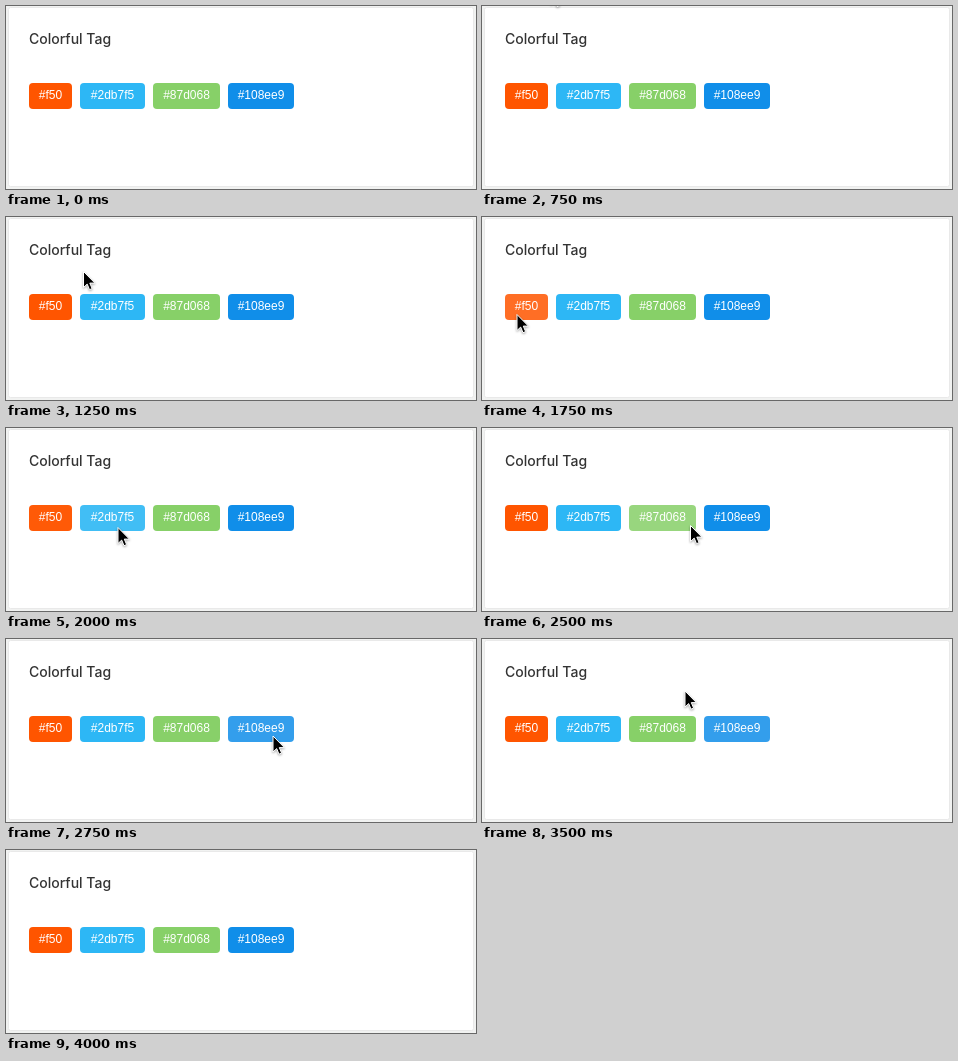
An HTML page that plays this animation: 470 px wide and 183 px high, repeating every 4.5 s.

```html
<!DOCTYPE html>
<html lang="en">
<head>
<meta charset="utf-8">
<title>Colorful Tag</title>
<style>
  html, body { margin: 0; width: 100%; height: 100%; overflow: hidden; background: #f1f2f1; }
  svg { display: block; }
  .title { font: 500 14px Inter, sans-serif; fill: #333; }
  .tag text { font: 12px "Liberation Sans", Arial, sans-serif; fill: #fff; text-anchor: middle; }
  #cursor { filter: drop-shadow(0 1px 1px rgba(0, 0, 0, .35)); }
</style>
</head>
<body>
<svg width="470" height="183" viewBox="0 0 470 183">
  <rect x="2.5" y="1.5" width="465" height="179" rx="2" fill="#fff" stroke="#e9e9e9"/>
  <text class="title" x="23" y="38">Colorful Tag</text>
  <g id="tags"></g>
  <path id="cursor" d="M0 0V16L3.7 12.6L6 18.2L8.6 17.1L6.3 11.6H11.4Z" fill="#000" stroke="#fff" stroke-width="1"/>
</svg>
<script>
const LOOP = 4500, STEP = 250, HOVER = 0.85;

const tags = [
  ['#f50', 23, 43],
  ['#2db7f5', 74, 65],
  ['#87d068', 147, 67],
  ['#108ee9', 222, 66],
].map(([color, x, width]) => {
  const group = add(document.getElementById('tags'), 'g', { class: 'tag' });
  add(group, 'rect', { x, y: 77, width, height: 26, rx: 4, fill: color });
  add(group, 'text', { x: x + width / 2, y: 93 }).textContent = color;
  return group;
});
const cursor = document.getElementById('cursor');

// Pointer position and tag opacities, held from each step until the next one
const rest = { at: null, fade: [1, 1, 1, 1] };
const poses = {
  3: { at: [69, -17.5] },
  4: { at: [80, 66] },
  5: { at: [77.5, 54.5] },
  6: { at: [26, 88.5], fade: [HOVER, 1, 1, 1] },
  7: { at: [35, 97.5], fade: [HOVER, 1, 1, 1] },
  8: { at: [112, 99.5], fade: [0.97, 0.9, 1, 1] },
  9: { at: [190, 97.5], fade: [1, 0.88, 0.95, 1] },
  10: { at: [208.5, 97.5], fade: [1, 1, HOVER, 1] },
  11: { at: [267, 97], fade: [1, 1, 0.99, HOVER] },
  12: { at: [267, 97], fade: [1, 1, 1, HOVER] },
  13: { at: [267, 97], fade: [1, 1, 1, HOVER] },
  14: { at: [203, 52], fade: [1, 1, 1, HOVER] },
};

function add(parent, name, attributes) {
  const node = document.createElementNS('http://www.w3.org/2000/svg', name);
  for (const key in attributes) node.setAttribute(key, attributes[key]);
  return parent.appendChild(node);
}

function draw(now) {
  const step = Math.floor((now % LOOP) / STEP);
  const { at, fade } = { ...rest, ...poses[step] };
  tags.forEach((tag, i) => tag.setAttribute('opacity', fade[i]));
  cursor.setAttribute('visibility', at ? 'visible' : 'hidden');
  if (at) cursor.setAttribute('transform', `translate(${at})`);
}

const start = performance.now();
function tick() {
  draw(performance.now() - start);
  requestAnimationFrame(tick);
}
tick();
</script>
</body>
</html>
```
